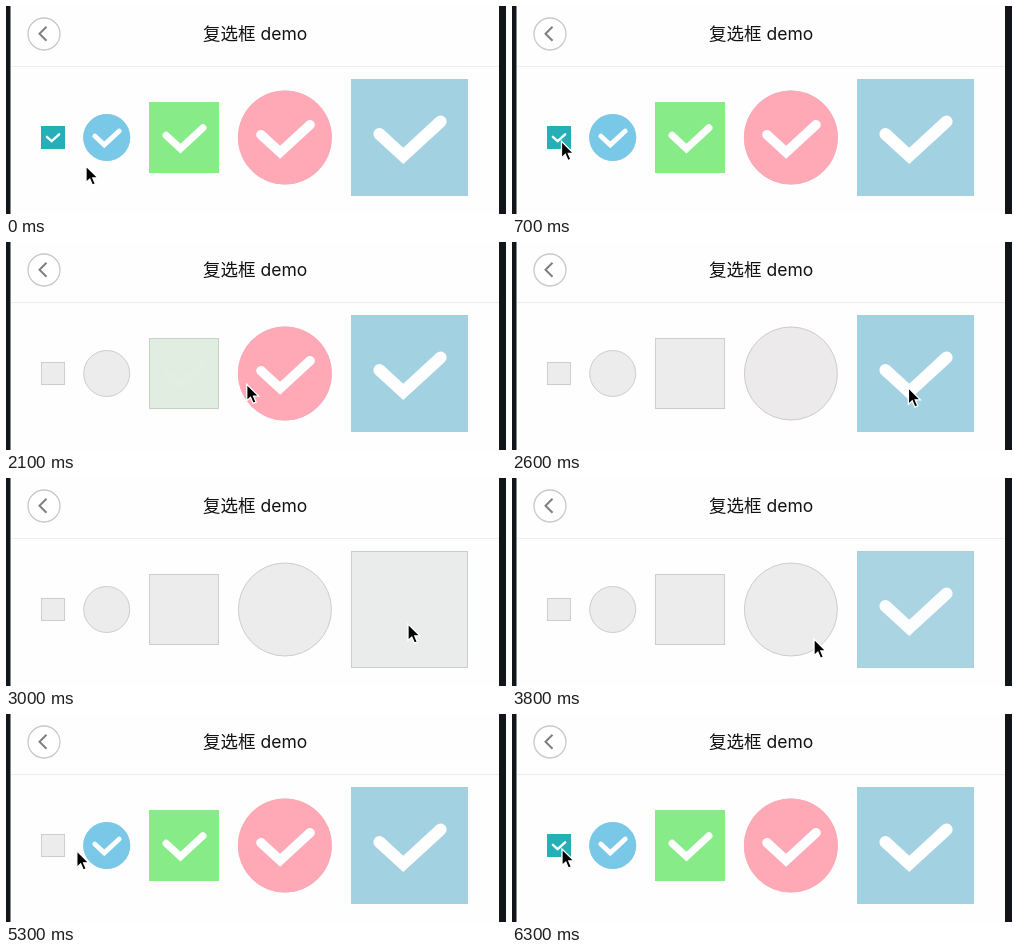
Recreate the animation shown at these times as an HTML page. Size 500 by 208 pixels, loop 6400 ms.

```html
<!DOCTYPE html>
<html lang="zh-CN">
<head>
<meta charset="utf-8">
<title>复选框 demo</title>
<style>
  html, body { margin: 0; width: 100%; height: 100%; overflow: hidden; background: #fff; }
  svg { display: block; }
  text { font: 17.5px Inter, "Noto Sans CJK SC", "Noto Sans CJK", sans-serif; fill: #111; }
  rect { shape-rendering: crispEdges; }
</style>
</head>
<body>
<svg width="500" height="208" viewBox="0 0 500 208">
  <rect width="500" height="208" fill="#fefefe"/>
  <path d="M5 60.5H493" stroke="#ededed"/>
  <path d="M0 0H4.5V208H0ZM493 0H500V208H493Z" fill="#111418"/>
  <circle cx="38" cy="28" r="16" fill="#fff" stroke="#c8c8c8" stroke-width="1.3"/>
  <path d="M40.5 20.8L33.5 27.8L40.5 34.8" fill="none" stroke="#808080" stroke-width="2"/>
  <text x="249.2" y="34" text-anchor="middle">复选框 demo</text>
  <g id="boxes"></g>
  <g id="pointer">
    <circle id="ring" cy="1.7" r="25.6" fill="none" stroke="#111" stroke-width="2"/>
    <path d="M0 0V16.5L3.8 13L6.4 19.2L9.4 17.9L6.8 11.9H12Z" fill="#000" stroke="#fff" stroke-width="1.3"/>
  </g>
</svg>
<script>
const LOOP = 6400, FRAME = 100, PRESS = 150, FADE = 300;
const UNIT = 23.5, GAP = 18.6, LEFT = 35.1, CENTER_Y = 131.5;
const colors = ['#25b0b8', '#7ac8e8', '#87ec87', '#ffa9b7', '#a2d1e1'];

// The pointer presses every box from left to right, then back again.
const home = { time: -PRESS, x: 80, y: 160 };
const visits = [
  [800, 49, 135], [1250, 92, 137], [1800, 177, 140], [2250, 262, 143], [2650, 402, 146],
  [3500, 402, 146], [3900, 283, 164], [4450, 178, 143], [4900, 105, 140], [5700, 50, 135]
].map(([time, x, y]) => ({ time, x, y }));

const $ = id => document.getElementById(id);
const clamp = v => Math.max(0, Math.min(1, v));
const smooth = v => v * v * (3 - 2 * v);
const easeOut = (v, power) => 1 - (1 - clamp(v)) ** power;

function shape(i, size, attrs) {
  return i % 2
    ? `<circle r="${size / 2}" ${attrs}/>`
    : `<rect x="${-size / 2}" y="${-size / 2}" width="${size}" height="${size}" ${attrs}/>`;
}

let left = LEFT;
$('boxes').innerHTML = colors.map((color, i) => {
  const size = UNIT * (i + 1), x = left + size / 2;
  left += size + GAP;
  return `<g transform="translate(${x} ${CENTER_Y})">
    ${shape(i, size - 1, 'fill="#ececec" stroke="#cdcdcd"')}
    <g class="fill">${shape(i, size, `fill="${color}"`)}</g>
    <path class="check" transform="scale(${size})" d="M-.254-.03L-.051.157L.267-.136"
      fill="none" stroke="#fff" stroke-width=".102" stroke-linecap="round"/>
  </g>`;
}).join('');
const fills = document.querySelectorAll('.fill');
const checks = document.querySelectorAll('.check');

// Progress of the fade that starts when a press is released
const toggled = (visit, t) => easeOut((t - visit.time - PRESS) / FADE, 3);

function pointerAt(t) {
  const next = visits.findIndex(v => v.time > t);
  if (next < 0) return visits.at(-1);
  const from = visits[next - 1] || home, to = visits[next];
  const leave = from.time + PRESS;
  const k = easeOut((t - leave) / (to.time - leave), 2);
  return { x: from.x + (to.x - from.x) * k, y: from.y + (to.y - from.y) * k };
}

function render(now) {
  const t = Math.floor(now % LOOP / FRAME) * FRAME;
  colors.forEach((_, i) => {
    const level = 1 - toggled(visits[i], t) + toggled(visits[visits.length - 1 - i], t);
    fills[i].setAttribute('opacity', level);
    checks[i].setAttribute('opacity', smooth(level));
  });
  const { x, y } = pointerAt(t);
  $('pointer').setAttribute('transform', `translate(${x} ${y})`);
  const pressed = visits.some(v => t >= v.time && t < v.time + PRESS);
  $('ring').setAttribute('visibility', pressed ? 'visible' : 'hidden');
}

const start = performance.now();
function tick() {
  render(performance.now() - start);
  requestAnimationFrame(tick);
}
tick();
</script>
</body>
</html>
```
